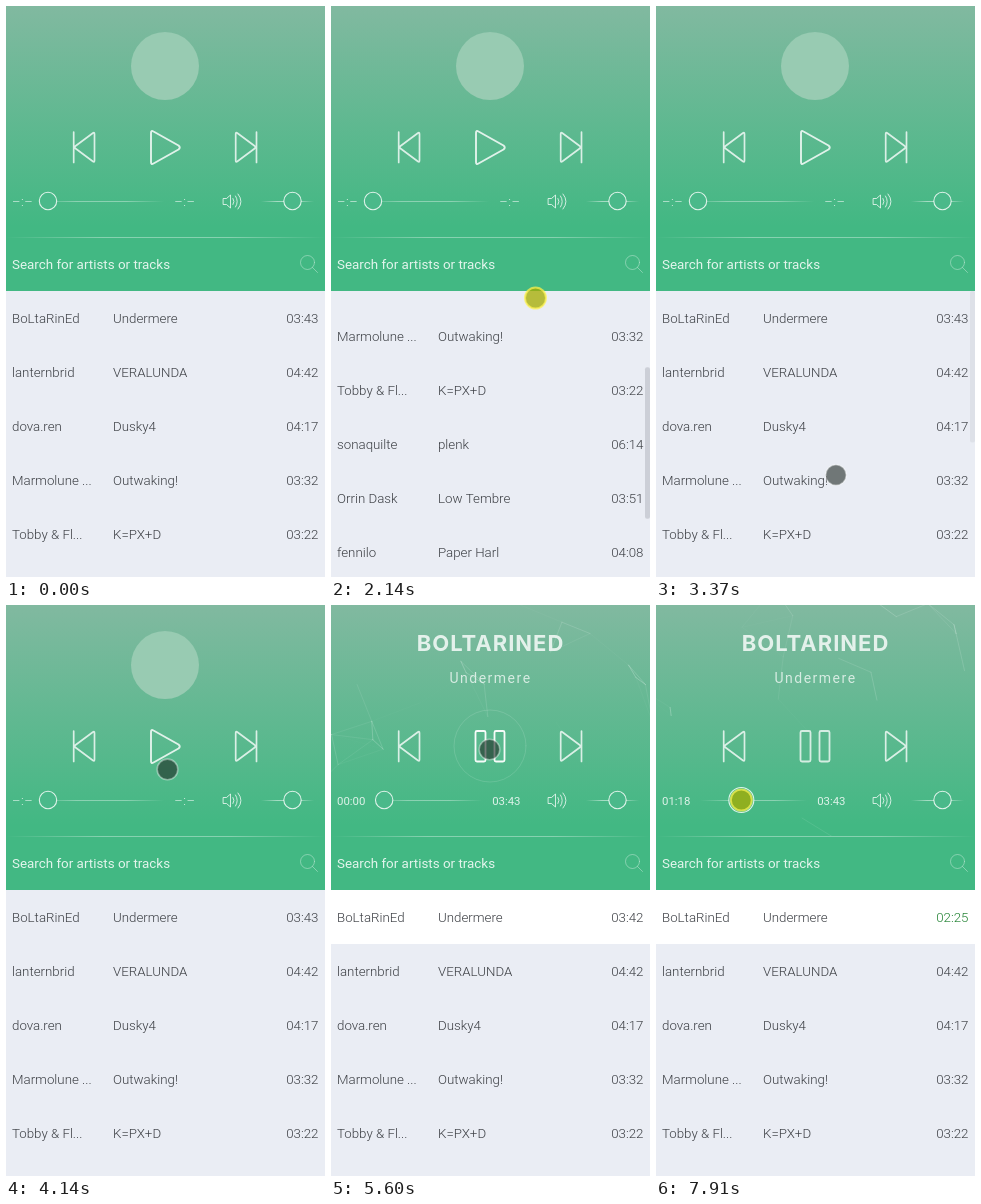
Recreate the animation shown at these times as an HTML page with a canvas. Size 319 by 571 pixels, loop 7990 ms.

```html
<!DOCTYPE html>
<html lang="en">
<head>
<meta charset="utf-8">
<title>Music player</title>
<style>
html, body { margin: 0; width: 100%; height: 100%; overflow: hidden; background: #eaedf4; }
canvas { display: block; width: 319px; height: 571px; }
</style>
</head>
<body>
<canvas></canvas>
<script>
const W = 319, H = 571, LOOP = 7990, TOP = 285, ROW = 54, LENGTH = 223;
const PLAY = 4720, SEEK = 7120;
const canvas = document.querySelector('canvas');
const ratio = window.devicePixelRatio || 1;
canvas.width = W * ratio;
canvas.height = H * ratio;
const c = canvas.getContext('2d');
c.scale(ratio, ratio);

const tracks = [
  ['BoLtaRinEd', 'Undermere', '03:43'],
  ['lanternbrid', 'VERALUNDA', '04:42'],
  ['dova.ren', 'Dusky4', '04:17'],
  ['Marmolune ...', 'Outwaking!', '03:32'],
  ['Tobby & Fl...', 'K=PX+D', '03:22'],
  ['sonaquilte', 'plenk', '06:14'],
  ['Orrin Dask', 'Low Tembre', '03:51'],
  ['fennilo', 'Paper Harl', '04:08'],
  ['Vask & Loom', 'Nightfell', '02:57'],
  ['urbelline', 'Sorrowick', '05:20']
];

// Each key: time, then values
const scrollKeys = [[1370, 0], [1600, 46], [1980, 144], [2400, 144], [2750, 52], [3060, 0]];
const cursorKeys = [
  [670, 101, 447], [900, 187, 456], [1370, 187, 456], [1600, 204.5, 390.5], [1980, 204.5, 292],
  [2370, 204.5, 292], [2750, 200.5, 410.5], [3130, 184, 499], [3300, 181, 495], [3980, 171, 246],
  [4140, 161.5, 164.5], [4400, 158.5, 144.5], [5700, 158.5, 144.5], [6670, 76.5, 211.5], [7000, 54, 195]
];
const seekKeys = [[SEEK, 2], [7820, 78]];
const presses = [[1220, 2180], [2330, 3160], [4600, 4800], [7050, LOOP]];

const clamp = v => Math.max(0, Math.min(1, v));
const fade = (t, start, span) => clamp((t - start) / span);
const mmss = s => [s / 60, s % 60].map(v => String(Math.floor(v)).padStart(2, '0')).join(':');
const white = a => `rgba(255,255,255,${a})`;

function at(keys, t) {
  const i = keys.findIndex(k => k[0] > t);
  if (i < 0) return keys[keys.length - 1].slice(1);
  if (i === 0) return keys[0].slice(1);
  const a = keys[i - 1], b = keys[i], u = (t - a[0]) / (b[0] - a[0]);
  return a.slice(1).map((v, j) => v + (b[j + 1] - v) * u);
}

function text(str, x, y, font, color, align = 'left', spacing = 0) {
  c.font = font + ', sans-serif';
  c.fillStyle = color;
  c.textAlign = align;
  c.textBaseline = 'alphabetic';
  c.letterSpacing = spacing + 'px';
  c.fillText(str, x, y);
}

function disc(x, y, r, fill, stroke, width = 1) {
  c.beginPath();
  c.arc(x, y, r, 0, Math.PI * 2);
  if (fill) { c.fillStyle = fill; c.fill(); }
  if (stroke) { c.strokeStyle = stroke; c.lineWidth = width; c.stroke(); }
}

function path(d, alpha, width) {
  c.strokeStyle = white(alpha);
  c.lineWidth = width;
  c.lineJoin = c.lineCap = 'round';
  c.stroke(new Path2D(d));
}

function fadedLine(x1, x2, y, alpha) {
  const g = c.createLinearGradient(x1, 0, x2, 0);
  g.addColorStop(0, white(0));
  g.addColorStop(0.3, white(alpha));
  g.addColorStop(0.7, white(alpha));
  g.addColorStop(1, white(0));
  c.fillStyle = g;
  c.fillRect(x1, y, x2 - x1, 1);
}

let seed = 11;
const random = () => (seed = seed * 16807 % 2147483647) / 2147483647;
const dots = Array.from({ length: 25 }, () => ({
  x: random() * 379, y: random() * 291,
  vx: (random() - 0.5) * 0.09, vy: (random() - 0.5) * 0.09
}));

function drawWeb(t, alpha) {
  const wrap = (v, size) => ((v % size) + size) % size - 30;
  const pts = dots.map(d => [wrap(d.x + d.vx * t, 379), wrap(d.y + d.vy * t, 291)]);
  c.save();
  c.beginPath();
  c.rect(0, 0, W, 231);
  c.clip();
  pts.forEach((p, i) => pts.slice(i + 1).forEach(q => {
    const d = Math.hypot(p[0] - q[0], p[1] - q[1]);
    if (d < 56) path(`M${p}L${q}`, alpha * 0.3 * (1 - d / 56), 1);
  }));
  c.restore();
}

function drawList(t, remaining) {
  const [scroll] = at(scrollKeys, t);
  const ink = '#3c3f44', font = '300 13.3px Roboto';
  c.fillStyle = '#eaedf4';
  c.fillRect(0, TOP, W, H - TOP);
  c.fillStyle = white(fade(t, PLAY, 200));
  c.fillRect(0, TOP - scroll, W, ROW);
  tracks.forEach(([artist, title, time], i) => {
    const y = TOP + i * ROW - scroll + 32;
    if (y > H + 15) return;
    const active = i === 0 && t >= PLAY;
    text(artist, 6, y, font, ink);
    text(title, 107, y, font, ink);
    text(active ? remaining : time, 312.5, y, font, active && t > SEEK ? '#1f8030' : ink, 'right');
  });
  const view = H - TOP, total = tracks.length * ROW;
  const alpha = fade(t, 1370, 100) * (1 - fade(t, 3200, 300));
  c.fillStyle = `rgba(190,193,200,${alpha * 0.65})`;
  c.beginPath();
  c.roundRect(314, TOP + scroll * view / total, 5, view * view / total, 2);
  c.fill();
}

function drawHeader(t, elapsed, thumbX) {
  const playing = t >= PLAY, shown = fade(t, 4830, 200);
  const g = c.createLinearGradient(0, 0, 0, 220);
  g.addColorStop(0, '#81b9a0');
  g.addColorStop(1, '#42b883');
  c.fillStyle = g;
  c.fillRect(0, 0, W, TOP);

  if (shown) drawWeb(t, shown);
  c.globalAlpha = 1 - fade(t, PLAY, 110);
  disc(159, 60, 34, '#98cbb2');
  c.globalAlpha = 1;
  text(tracks[0][0].toUpperCase(), 159.5, 45.5, '700 22px Inter', white(0.8 * shown), 'center', 1);
  text(tracks[0][1], 159.5, 78, '400 14px Roboto', white(0.72 * shown), 'center', 1.5);
  disc(159, 141, 36, null, white(0.13 * shown * (1 - fade(t, 6900, 500))));

  path('M67.7 126V156.5M87 127Q88.5 126 88.5 128V154.5Q88.5 156.5 87 155.5L69.5 142.5Q68 141.3 69.5 140Z', 0.78, 1.7);
  path('M250.5 126V156.5M231.2 127Q229.7 126 229.7 128V154.5Q229.7 156.5 231.2 155.5L248.7 142.5Q250 141.3 248.7 140Z', 0.78, 1.7);
  if (playing) {
    path('M146 126H153Q154.5 126 154.5 127.5V155Q154.5 156.5 153 156.5H146Q144.5 156.5 144.5 155V127.5Q144.5 126 146 126Z' +
      'M165 126H172Q173.5 126 173.5 127.5V155Q173.5 156.5 172 156.5H165Q163.5 156.5 163.5 155V127.5Q163.5 126 165 126Z',
      0.95 - 0.2 * fade(t, 6800, 400), 1.8);
  } else {
    path('M145 127Q145 124 147.5 125.5L172.5 139.5Q175 141.5 172.5 143.5L147.5 157.5Q145 159 145 156Z', 0.82, 1.9);
  }

  const label = white(0.82), clock = '400 11.4px Roboto', blank = '300 13px Roboto';
  if (playing) {
    text(mmss(elapsed), 6, 199.5, clock, label);
    text(tracks[0][2], 189.5, 199.5, clock, label, 'right');
  } else {
    text('–:–', 6, 200, blank, label, 'left', 0.5);
    text('–:–', 189.5, 200, blank, label, 'right', 0.5);
  }
  fadedLine(playing ? 44 : 33, playing ? 151 : 158, 195, 0.36);
  fadedLine(255, 308, 195, 0.5);
  disc(thumbX, 195, t > 7050 ? 12.5 : 8.7, '#4ab98a', white(0.82), 1.1);
  disc(286.5, 195, 8.7, '#4ab98a', white(0.82), 1.1);
  path('M217.5 192.5H220.5L224.5 189V202L220.5 198.5H217.5ZM227 192.5Q229 195.5 227 198.5M229.5 190Q233 195.5 229.5 201M232 188Q238 195.5 232 203', 0.75, 1);

  fadedLine(0, W, 231, 0.36);
  text('Search for artists or tracks', 6, 263, '400 13.4px Roboto', white(0.85));
  disc(301.5, 256.5, 7, null, white(0.35));
  path('M306.5 261.5L311.5 266.5', 0.35, 1);
}

function drawCursor(t, thumbX) {
  if (t < 670) return;
  let [x, y] = at(cursorKeys, t);
  if (t >= SEEK) x = thumbX;
  const pressed = presses.some(([a, b]) => t >= a && t < b);
  if (pressed) disc(x, y, 10.5, 'rgba(165,172,0,.76)', 'rgba(255,243,80,.7)', 2);
  else disc(x, y, 10.3, 'rgba(30,40,35,.6)', white(0.4), 1.6);
}

function draw(t) {
  const playing = t >= PLAY;
  const elapsed = t >= SEEK ? at(seekKeys, t)[0] : Math.max(0, (t - PLAY) / 1000);
  const thumbX = playing ? 52.8 + elapsed / LENGTH * 93 : 42;
  const remaining = mmss(LENGTH - Math.floor(elapsed) - (elapsed < 10 ? 1 : 0));
  c.clearRect(0, 0, W, H);
  drawList(t, remaining);
  drawHeader(t, elapsed, thumbX);
  drawCursor(t, thumbX);
}

const start = performance.now();
function tick() {
  draw((performance.now() - start) % LOOP);
  requestAnimationFrame(tick);
}
tick();
</script>
</body>
</html>
```
